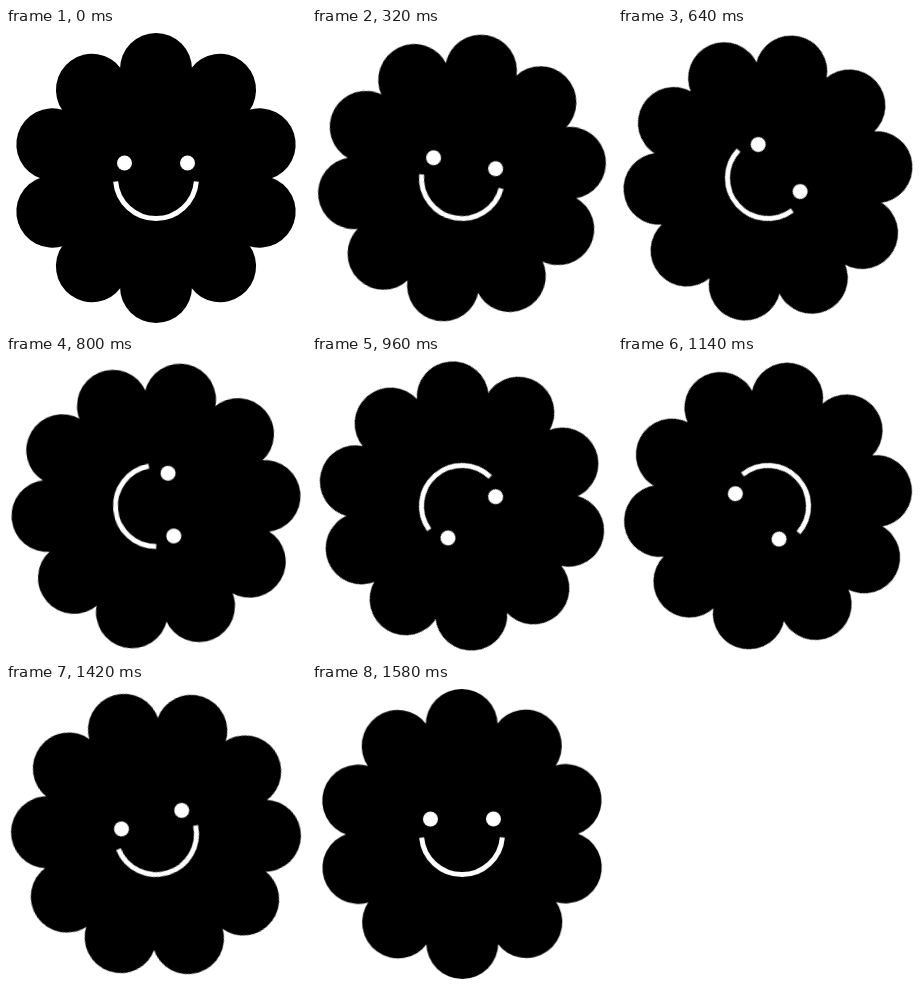
Recreate the animation shown at these times as an HTML page without scripts. Size 300x300 px, loop 1.6 s.

```html
<!DOCTYPE html>
<html lang="en">
<head>
<meta charset="utf-8">
<title>Spinning flower</title>
<style>
  html, body { margin: 0; width: 100%; height: 100%; overflow: hidden; background: #fff; }
  svg { display: block; width: 100vw; height: 100vh; }
  .flower {
    transform-origin: 0 0;
    animation: spin 1600ms cubic-bezier(.75, 0, .67, 1) infinite;
  }
  .petals { stroke: #000; stroke-width: 72; stroke-linecap: round; }
  .eyes { fill: #fff; }
  .smile { fill: none; stroke: #fff; stroke-width: 5; }
  @keyframes spin {
    from { transform: rotate(0deg); }
    to { transform: rotate(360deg); }
  }
</style>
</head>
<body>
<svg viewBox="-150 -150 300 300">
  <g class="flower">
    <!-- Each round-capped bar forms two opposite petals -->
    <g class="petals">
      <path id="bar" d="M0-109V109"/>
      <use href="#bar" transform="rotate(36)"/>
      <use href="#bar" transform="rotate(72)"/>
      <use href="#bar" transform="rotate(108)"/>
      <use href="#bar" transform="rotate(144)"/>
    </g>
    <g class="eyes">
      <circle cx="-31.5" cy="-15" r="7.5"/>
      <circle cx="31.5" cy="-15" r="7.5"/>
    </g>
    <path class="smile" d="M-40.35 3.5A40.5 40.5 0 0 0 40.35 3.5"/>
  </g>
</svg>
</body>
</html>
```
